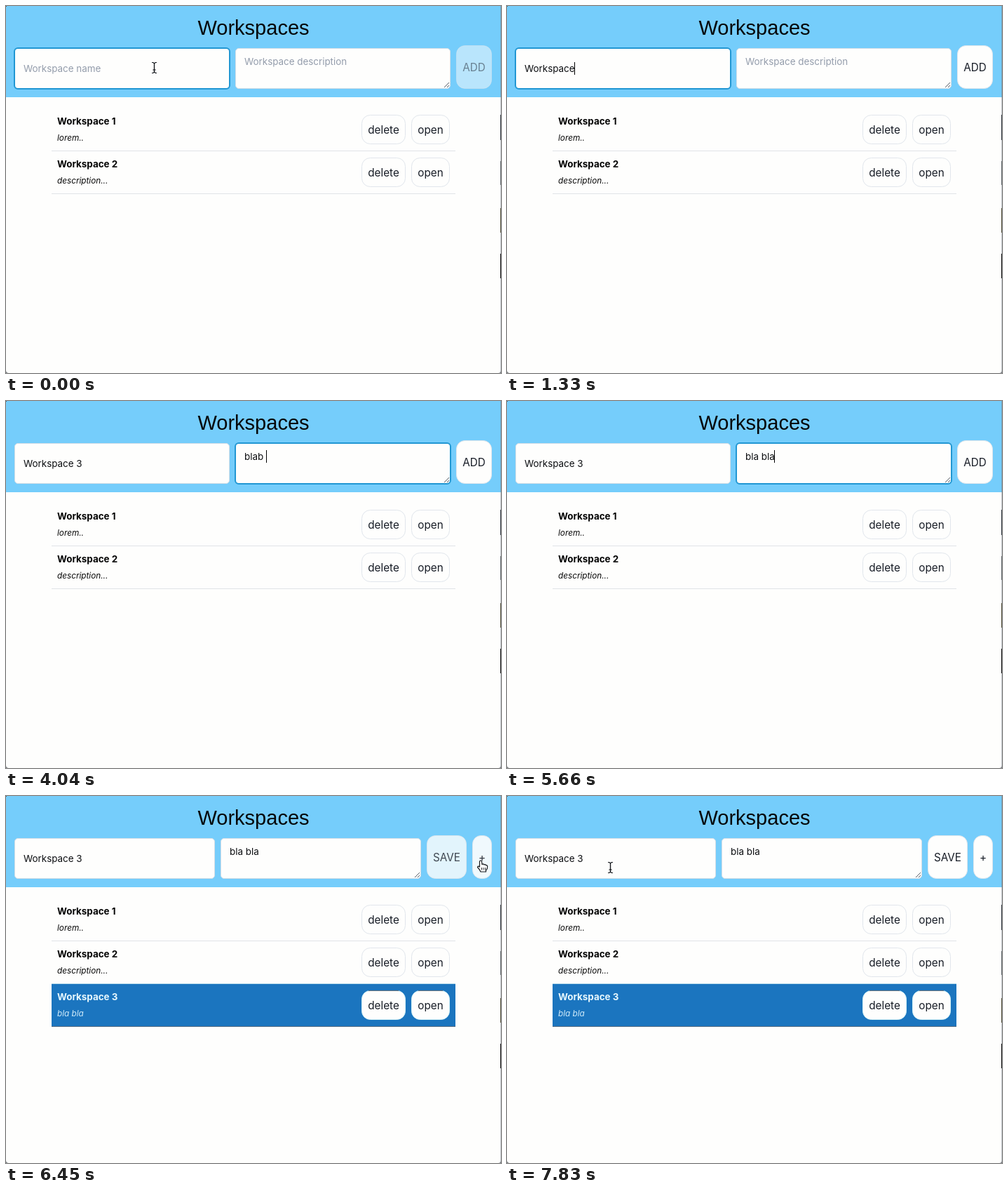
Recreate the animation shown at these times as an HTML page with a canvas. Size 706 by 523 pixels, loop 8000 ms.

```html
<!DOCTYPE html>
<html lang="en">
<head>
<meta charset="utf-8">
<title>Workspaces</title>
<style>
  html, body { margin: 0; width: 100%; height: 100%; overflow: hidden; background: #fefefd; }
  canvas { display: block; width: 706px; height: 523px; }
</style>
</head>
<body>
<canvas id="stage" width="706" height="523"></canvas>
<script>
const ctx = document.getElementById('stage').getContext('2d');
const LOOP = 8000;
const PAPER = '#fefefd', INK = '#0b0d10', BUTTON_INK = '#171c26', HINT = '#939cab';
const SANS = 'Inter, "Open Sans", sans-serif';
const FONT = {
  title: '29px "Liberation Sans", Arial, sans-serif',
  field: `13.4px ${SANS}`,
  button: `15.3px ${SANS}`,
  name: `bold 13.4px ${SANS}`,
  note: `italic 11.75px ${SANS}`
};

// Each list holds [start time, value]; a value stays until the next start.
const NAME = [[0, ''], [210, 'W'], [420, 'Wo'], [540, 'Wor'], [710, 'Work'], [910, 'Worksp'],
  [1120, 'Workspa'], [1330, 'Workspace'], [1620, 'Workspace '], [1830, 'Workspace 3']];
const NOTE = [[0, ''], [3040, 'b'], [3250, 'bl'], [3450, 'bla'], [3660, 'blab'], [4040, 'blab '],
  [4450, 'blab'], [4830, 'bla'], [5040, 'bla '], [5250, 'bla b'], [5450, 'bla bl'], [5660, 'bla bla']];
const FOCUS = [[0, 'name'], [2660, 'note'], [6250, '']];
const CARET = [[0, false], [40, true], [6250, false]];
const POINTER = [[0, ['beam', 211, 88]], [210, null], [2040, ['beam', 240, 90]],
  [2250, ['beam', 400, 98]], [2450, ['beam', 528, 102]], [3040, null],
  [5830, ['beam', 580, 102]], [6040, ['hand', 668, 94]], [6250, ['hand', 677, 92]],
  [7250, ['beam', 540, 106]], [7450, ['beam', 330, 107]], [7660, ['beam', 185, 104]],
  [7830, ['beam', 147, 102]]];
const MAIN_ALPHA = [[0, 0.5], [210, 0.85], [420, 1], [6040, 0.85], [6250, 0.75], [6450, 0.8], [6660, 1]];
const PLUS_ALPHA = [[0, 0.9], [6660, 0.78], [7250, 1]];
const ADDED_AT = 6450;

function at(track, time) {
  let value;
  for (const [start, v] of track) if (time >= start) value = v;
  return value;
}

function rect(x, y, w, h, color) {
  ctx.fillStyle = color;
  ctx.fillRect(x, y, w, h);
}

function text(str, x, y, font, color, align = 'left') {
  ctx.font = font;
  ctx.fillStyle = color;
  ctx.textAlign = align;
  ctx.fillText(str, x, y);
}

function line(points, color, width = 1) {
  ctx.beginPath();
  points.forEach(([x, y]) => ctx.lineTo(x, y));
  ctx.strokeStyle = color;
  ctx.lineWidth = width;
  ctx.stroke();
}

function box(x, y, w, h, radius, border, width = 1) {
  const inset = width / 2;
  ctx.beginPath();
  ctx.roundRect(x + inset, y + inset, w - width, h - width, radius);
  ctx.fillStyle = PAPER;
  ctx.fill();
  ctx.strokeStyle = border;
  ctx.lineWidth = width;
  ctx.stroke();
}

function button(label, x, y, w, h, alpha = 1, border = '#e1e6ec') {
  ctx.globalAlpha = alpha;
  box(x, y, w, h, 12, border);
  text(label, x + w / 2, y + h / 2 + 5.8, FONT.button, BUTTON_INK, 'center');
  ctx.globalAlpha = 1;
}

function field(x, w, value, hint, baseline, focused, caret) {
  if (focused) box(x - 1, 59, w + 2, 60, 5, '#2197d3', 2);
  else box(x, 60, w, 58, 4.5, '#d5dee6');
  text(value || hint, x + 13, baseline, FONT.field, value ? INK : HINT);
  if (focused && caret) {
    const end = value ? ctx.measureText(value).width : 0;
    rect(Math.round(x + 12.6 + end), baseline - 14, 1, 18, '#000');
  }
}

function resizeGrip(right) {
  line([[right - 9, 116], [right - 2, 109]], '#59616a');
  line([[right - 5, 116], [right - 2, 113]], '#59616a');
}

function row(index, name, note, active) {
  const y = 146 + index * 61;
  if (active) {
    rect(65, y - 1, 576, 1, '#b9dcec');
    rect(65, y, 576, 60, '#1b75bf');
  }
  rect(65, y + 60, 576, 1, active ? '#586c80' : '#e0e3e7');
  text(name, 73, y + 23, FONT.name, active ? '#e6f7fd' : '#050505');
  text(note, 73, y + 46, FONT.note, active ? '#d0ebf9' : '#080808');
  const border = active ? '#d6f4f7' : '#e1e6ec';
  for (const [label, x, w] of [['delete', 507, 63], ['open', 578, 55]]) {
    button(label, x, y + 9, w, 42, 1, border);
    if (active) line([[x + 10, y + 9.5], [x + w - 10, y + 9.5]], '#66717b');
  }
}

function beam(x, y) {
  const strokes = [['#ffffff', 3], ['#15181c', 1.2]];
  for (const [color, width] of strokes) {
    line([[x - 3, y - 7.5], [x - 1, y - 7.5], [x + 0.5, y - 6], [x + 0.5, y + 6],
      [x - 1, y + 7.5], [x - 3, y + 7.5]], color, width);
    line([[x + 4, y - 7.5], [x + 2, y - 7.5], [x + 0.5, y - 6], [x + 0.5, y + 6],
      [x + 2, y + 7.5], [x + 4, y + 7.5]], color, width);
    line([[x - 1.5, y + 3], [x + 2.5, y + 3]], color, width);
  }
}

function hand(x, y) {
  ctx.save();
  ctx.translate(x, y);
  ctx.lineJoin = 'round';
  ctx.beginPath();
  ctx.moveTo(-1.5, 9);
  ctx.lineTo(-1.5, 1);
  ctx.quadraticCurveTo(0, -1, 1.5, 1);
  ctx.lineTo(2, 5.5);
  ctx.quadraticCurveTo(4, 4, 5, 6);
  ctx.quadraticCurveTo(7, 4.7, 7.7, 7);
  ctx.quadraticCurveTo(9.6, 6, 9.7, 8.5);
  ctx.quadraticCurveTo(9.8, 12, 7.5, 14);
  ctx.lineTo(7.5, 16);
  ctx.lineTo(0, 16);
  ctx.quadraticCurveTo(-1, 13, -4.5, 9.5);
  ctx.quadraticCurveTo(-4, 7, -1.5, 9);
  ctx.closePath();
  ctx.fillStyle = '#fff';
  ctx.fill();
  ctx.strokeStyle = '#15181c';
  ctx.lineWidth = 1.2;
  ctx.stroke();
  for (const fold of [1.5, 4, 6.5]) line([[fold, 10], [fold, 13.5]], '#15181c', 0.9);
  ctx.restore();
}

function windowEdge() {
  rect(705, 0, 1, 523, '#c3c8cc');
  rect(705, 0, 1, 130, '#6fa5c2');
  for (const [y, h, color] of [[155, 36, '#283039'], [221, 34, '#5c6268'],
    [288, 35, '#4c4933'], [353, 35, '#050505']]) rect(705, y, 1, h, color);
  rect(0, 0, 1, 1, '#37505f');
  for (const [x, dir] of [[0, 1], [706, -1]]) {
    ctx.beginPath();
    ctx.moveTo(x, 519);
    ctx.quadraticCurveTo(x, 523, x + 4 * dir, 523);
    ctx.lineTo(x, 523);
    ctx.fillStyle = '#70757a';
    ctx.fill();
  }
}

function draw(time) {
  const added = time >= ADDED_AT;
  const focus = at(FOCUS, time), caret = at(CARET, time);
  const width = added ? 286 : 307;
  const noteX = added ? 306 : 327;

  rect(0, 0, 706, 523, PAPER);
  rect(0, 0, 706, 130, '#75cdfb');
  text('Workspaces', 353, 41, FONT.title, '#050708', 'center');

  field(12, width, at(NAME, time), 'Workspace name', 94, focus === 'name', caret);
  field(noteX, width, at(NOTE, time), 'Workspace description', 84, focus === 'note', caret);
  resizeGrip(noteX + width);

  const alpha = at(MAIN_ALPHA, time);
  if (added) {
    button('SAVE', 600, 56, 57, 62, alpha);
    button('+', 665, 56, 28, 62, at(PLUS_ALPHA, time));
  } else {
    button('ADD', 642, 56, 51, 62, alpha);
  }

  row(0, 'Workspace 1', 'lorem..');
  row(1, 'Workspace 2', 'description...');
  if (added) row(2, 'Workspace 3', 'bla bla', true);
  windowEdge();

  const pointer = at(POINTER, time);
  if (pointer) {
    const [kind, x, y] = pointer;
    (kind === 'hand' ? hand : beam)(x, y);
  }
}

function tick() {
  draw(performance.now() % LOOP);
  requestAnimationFrame(tick);
}
tick();
</script>
</body>
</html>
```
